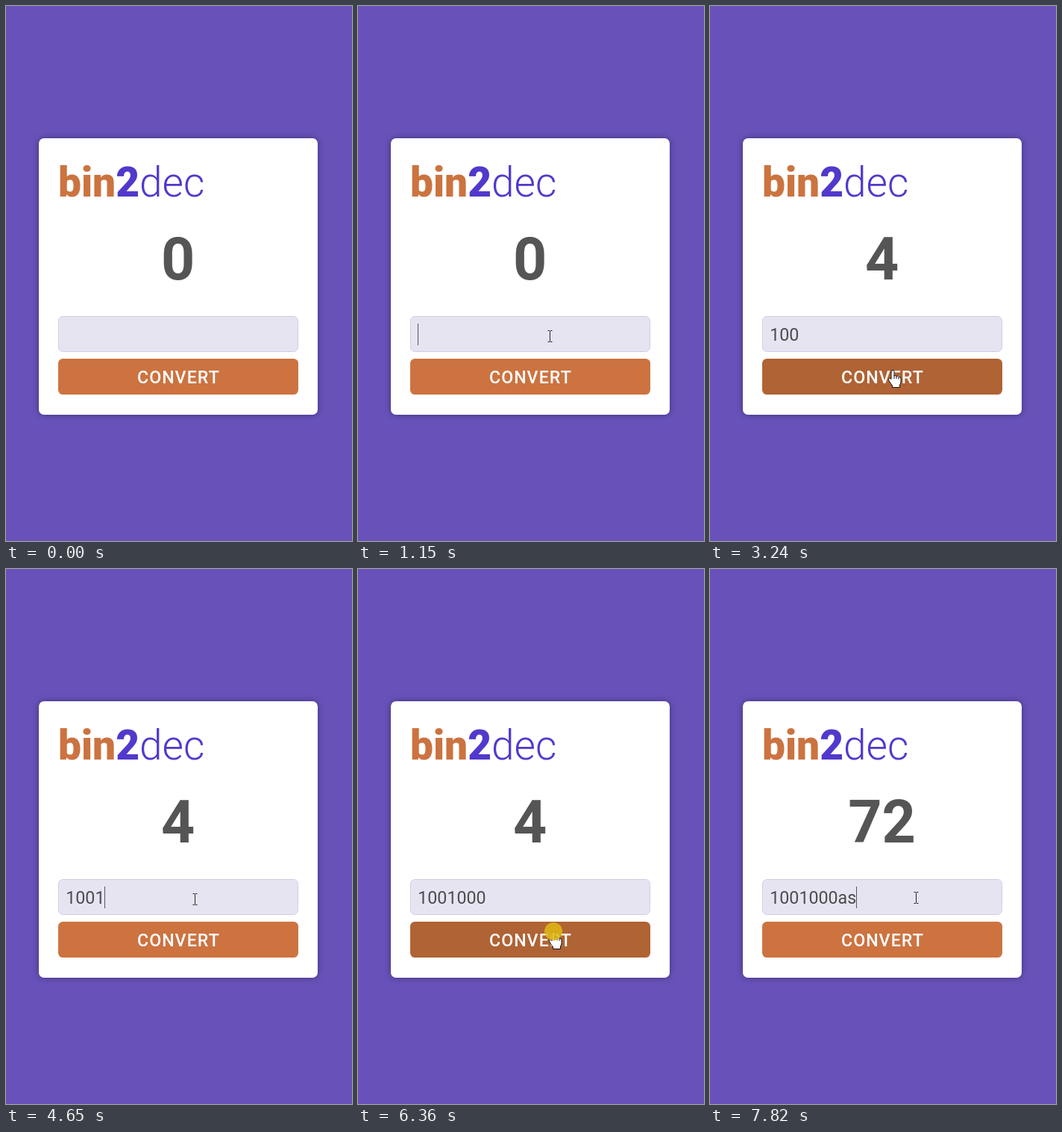
Recreate the animation shown at these times as an HTML page. Size 464 px wide and 716 px high, loop 8 s.

```html
<!DOCTYPE html>
<html lang="en">
<head>
<meta charset="utf-8">
<title>bin2dec</title>
<style>
  html, body { margin: 0; width: 100%; height: 100%; overflow: hidden; background: #6852ba; }
  .card { position: absolute; left: 44px; top: 177px; width: 374px; height: 370px;
    border-radius: 7px; background: #fff; box-shadow: 0 0 10px rgba(0, 0, 0, .37); }
  svg { position: absolute; left: 0; top: 0; font-family: Roboto, sans-serif; }
  .title { font-size: 55px; font-weight: 300; fill: #5139cc; }
  .bin { font-weight: 900; fill: #cc7340; }
  .two { font-weight: 900; }
  #result { font-size: 79px; font-weight: 700; fill: #555; text-anchor: middle; }
  #entry { font-size: 23.2px; fill: #4c4c4c; }
  .label { font-size: 23.2px; font-weight: 500; letter-spacing: 1px; fill: #fff; }
  #arrow, #hand { fill: #fff; stroke: #111; stroke-linejoin: round; }
  #beam { fill: none; stroke: #222; }
</style>
</head>
<body>
<div class="card"></div>
<svg width="464" height="716" viewBox="0 0 464 716">
  <text class="title" x="70" y="254.6"><tspan class="bin">bin</tspan><tspan class="two">2</tspan>dec</text>
  <text id="result" x="230.6" y="366.3"></text>
  <rect x="70.5" y="415.5" width="321" height="47" rx="6" fill="#e7e4f2" stroke="#cfcbe6"/>
  <text id="entry" x="80.3" y="448"></text>
  <rect id="caret" y="425" width="1" height="29" fill="#555"/>
  <rect id="button" x="70" y="472" width="322" height="48" rx="6.4"/>
  <text class="label" x="176" y="505">CONVERT</text>
  <g id="pointer">
    <path id="arrow" d="M.5 .5V17L4.2 13.5L6.7 19L9 18L6.5 12.5H11.5Z"/>
    <g id="hand">
      <path d="M-2 2Q-2 .3 0 .3T2 2V8Q3.6 6.8 5 8.5Q6.8 7.5 8 9.3Q11 8.7 11 12V16Q11 18 9.5 20V23.5H-.5V21Q-3 18 -5.5 13.5Q-6 11.3 -4.5 11Q-3 11 -2 12.5Z"/>
      <path d="M2 7V12M5 8.5V12M8 9.5V12.5"/>
    </g>
    <path id="beam" d="M-3 -7.5H-.5M.5 -7.5H3M0 -7V7M-3 7.5H-.5M.5 7.5H3"/>
    <circle id="click" r="12" fill="#e0b913" fill-opacity=".85"/>
  </g>
</svg>
<script>
const LOOP = 8000, TICK = 77, BLINK = 530;
const $ = id => document.getElementById(id);
const show = (id, on) => $(id).setAttribute('visibility', on ? 'inherit' : 'hidden');

// Pointer moves, each from where the last one ended.
const entrance = { x: 365, y: 707 };
const moves = [
  { at: 460, ms: 462, x: 257.5, y: 442 },
  { at: 1155, ms: 77, x: 261.5, y: 437.5 },
  { at: 2330, ms: 308, x: 246, y: 467 },
  { at: 2640, ms: 370, x: 245, y: 487 },
  { at: 3795, ms: 460, x: 253.5, y: 442 },
  { at: 5745, ms: 460, x: 262, y: 485 },
  { at: 6825, ms: 154, x: 273.5, y: 442 },
  { at: 7135, ms: 231, x: 276.5, y: 440 }
];
const typing = [
  { at: 1550, gap: 157, text: '100' },
  { at: 4650, gap: 157, text: '1000' },
  { at: 7590, gap: 230, text: 'as' }
];
const clicks = [
  { at: 1070, ms: 80 },
  { at: 3160, ms: 80, button: true },
  { at: 4250, ms: 80 },
  { at: 6360, ms: 160, button: true },
  { at: 7130, ms: 80 }
];
const keyTimes = typing.flatMap(b => [...b.text].map((_, i) => b.at + i * b.gap));
const allText = typing.map(b => b.text).join('');
const typed = t => allText.slice(0, keyTimes.filter(k => t >= k).length);

// The screen refreshes the pointer once per tick; x runs ahead of y, bending the path.
function pointerAt(t) {
  let { x, y } = entrance;
  for (const m of moves) {
    if (t < m.at) break;
    const u = Math.min(1, Math.floor((t - m.at + 7) / TICK) * TICK / m.ms);
    const p = u * u * (3 - 2 * u);
    x += (m.x - x) * (1 - (1 - p) ** 1.5);
    y += (m.y - y) * p;
  }
  return [x, y];
}

function caretOn(t) {
  const last = clicks.findLast(c => t >= c.at);
  if (!last || last.button) return false;
  const reset = Math.max(last.at, ...keyTimes.filter(k => t >= k));
  return (t - reset) % (2 * BLINK) < BLINK;
}

function resultAt(t) {
  const press = clicks.findLast(c => c.button && t >= c.at + c.ms);
  return press ? parseInt(typed(press.at), 2) : 0;
}

function draw(t) {
  const [x, y] = pointerAt(t);
  const visible = t >= 460 && (t < 1300 || t >= 2400); // hidden while typing
  const inside = (top, bottom) => x >= 70 && x < 392 && y >= top && y < bottom;
  const onButton = visible && inside(472, 520), onInput = inside(415, 463);

  $('entry').textContent = typed(t);
  $('result').textContent = resultAt(t);
  $('caret').setAttribute('x', Math.round(80 + $('entry').getComputedTextLength()));
  $('button').setAttribute('fill', onButton ? '#b06334' : '#cc7340');
  $('pointer').setAttribute('transform', `translate(${x} ${y})`);
  show('pointer', visible);
  show('caret', caretOn(t));
  show('click', clicks.some(c => t >= c.at && t < c.at + c.ms));
  show('hand', onButton);
  show('beam', onInput);
  show('arrow', !onButton && !onInput);
}

let origin;
function frame(now) {
  origin ??= now;
  draw((now - origin) % LOOP);
  requestAnimationFrame(frame);
}
draw(0);
requestAnimationFrame(frame);
</script>
</body>
</html>
```
